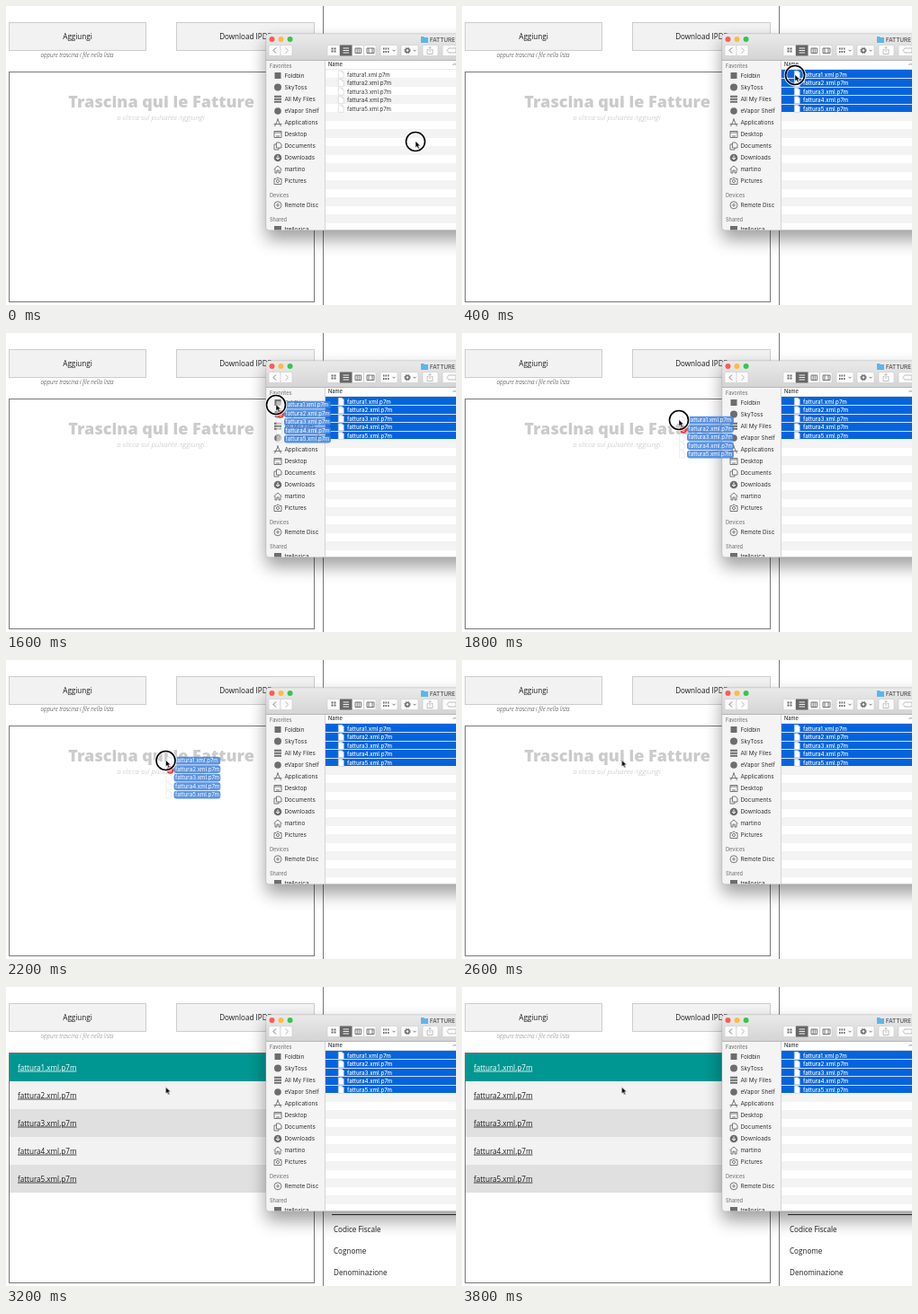
Animation of 500 by 333 pixels, one loop 4 s. Source, as an HTML page:

```html
<!DOCTYPE html>
<html lang="it">
<head>
<meta charset="utf-8">
<title>Trascina qui le Fatture</title>
<style>
  html, body { margin: 0; width: 100%; height: 100%; overflow: hidden; background: #fff; }
  svg { display: block; width: 500px; height: 333px; }
  text { white-space: pre; }
  .page { font: 8.1px "Open Sans", sans-serif; fill: #1c1c1c; }
  .mid { text-anchor: middle; }
  .title { font-size: 18px; font-weight: 800; fill: #cbcbcb; }
  .sub { font-size: 7.9px; font-weight: 300; font-style: italic; fill: #b8b8b8; }
  .hint { font-size: 6.3px; font-weight: 300; font-style: italic; }
  .link { text-decoration: underline; }
  .ui { font: 6.4px Inter, "Liberation Sans", sans-serif; fill: #333; }
  .head { font-size: 5.6px; font-weight: 500; fill: #7c7c7c; }
  .file { font-size: 6.2px; }
  .picked .file { fill: #fff; font-weight: 500; }
  .shadow { filter: blur(9.5px); }

  .hint, .empty, .loaded, .rest, .first, .ring, .ghost, .cursor {
    animation: 4s step-end infinite;
  }
  .hint { animation-name: fade; }
  .empty { animation-name: empty; }
  .loaded { animation-name: loaded; }
  .rest { animation-name: rest; }
  .first { animation-name: first; }
  .ring { animation-name: ring; }
  .ghost { animation-name: ghost; }
  .cursor { animation-name: move; }

  @keyframes fade { 0% { fill: #222 } 70%, 100% { fill: #777 } }
  @keyframes empty { 0% { visibility: visible } 70%, 100% { visibility: hidden } }
  @keyframes loaded { 0% { visibility: hidden } 70%, 100% { visibility: visible } }
  @keyframes rest { 0% { visibility: hidden } 5%, 100% { visibility: visible } }
  @keyframes first { 0% { visibility: hidden } 10%, 100% { visibility: visible } }
  @keyframes ring { 0% { visibility: visible } 65%, 100% { visibility: hidden } }
  @keyframes ghost {
    0% { visibility: hidden } 35% { visibility: visible } 65%, 100% { visibility: hidden }
  }
  @keyframes move {
    0% { transform: translate(455px, 151px) }
    5% { transform: translate(396px, 92px) }
    10% { transform: translate(370px, 77px) }
    30% { transform: translate(369px, 76px) }
    35% { transform: translate(362px, 75px) }
    40% { transform: translate(300px, 80px) }
    45% { transform: translate(241px, 97px) }
    50% { transform: translate(185px, 108px) }
    55%, 100% { transform: translate(177.5px, 112px) }
  }
</style>
</head>
<body>
<svg viewBox="0 0 500 333">
  <defs>
    <linearGradient id="bar" x2="0" y2="1">
      <stop stop-color="#ebeaeb"/><stop offset="1" stop-color="#d5d4d5"/>
    </linearGradient>
    <clipPath id="frame"><rect x="289" y="31" width="240" height="218.5" rx="3.5"/></clipPath>
    <g id="doc">
      <path d="M-3-4h4l2 2v6h-6z" fill="#fff" stroke="#c4c4c4" stroke-width=".5"/>
      <path d="M1-4v2h2" fill="none" stroke="#c4c4c4" stroke-width=".5"/>
    </g>
  </defs>

  <g class="page">
    <g fill="#f2f2f2" stroke="#cdcdcd">
      <rect x="3.5" y="18.5" width="152" height="31"/>
      <rect x="189.5" y="18.5" width="153" height="31"/>
    </g>
    <text class="mid" x="79.5" y="37">Aggiungi</text>
    <text class="mid" x="266" y="37">Download IPDF</text>
    <text class="mid hint" x="79" y="57">oppure trascina i file nella lista</text>
    <g class="empty">
      <text class="mid title" x="172.5" y="113">Trascina qui le Fatture</text>
      <text class="mid sub" x="172" y="127">o clicca sul pulsante Aggiungi</text>
    </g>
    <g class="loaded" id="list"></g>
    <rect x="3.5" y="73.5" width="339" height="256" fill="none" stroke="#777"/>
    <path d="M352.5 0v333" stroke="#777"/>
    <g class="loaded">
      <path d="M362 253.5h138" stroke="#333"/>
      <text x="364" y="273">Codice Fiscale</text>
      <text x="364" y="297">Cognome</text>
      <text x="364" y="321">Denominazione</text>
    </g>
  </g>

  <rect class="shadow" x="289" y="40" width="260" height="220" opacity=".38"/>

  <g class="ui" clip-path="url(#frame)">
    <rect x="289" y="31" width="240" height="219" fill="#fff"/>
    <rect x="289" y="60" width="65" height="190" fill="#f4f4f5"/>
    <path d="M354.5 60v190" stroke="#d3d3d3"/>
    <rect x="289" y="31" width="240" height="29" fill="url(#bar)"/>
    <path d="M289 60.5h211" stroke="#b7b5b7"/>
    <circle cx="295.5" cy="37" r="3" fill="#fc5b57"/>
    <circle cx="305.5" cy="37" r="3" fill="#fdbc40"/>
    <circle cx="315.6" cy="37" r="3" fill="#34c84a"/>
    <path d="M461 34h3l1 1h4v6h-8z" fill="#5cb6ea"/>
    <text x="471" y="39.6">FATTURE</text>
    <g id="tools" fill="#fbfbfb" stroke="#c4c2c4" stroke-width=".5"></g>
    <rect x="371" y="43.5" width="13.5" height="12" fill="#666"/>
    <g fill="none" stroke="#6a6a6a" stroke-width=".9">
      <path d="M300 46.5l-3 3 3 3"/>
      <path d="M310.5 46.5l3 3-3 3" stroke="#b5b5b5"/>
      <path d="M361.5 47.5h2m1 0h2m-5 3h2m1 0h2" stroke-width="2"/>
      <path d="M374.5 47h6.5m-6.5 2.5h6.5m-6.5 2.5h6.5" stroke="#fff"/>
      <path d="M388 47h6.5v5.5h-6.5zM390.2 47v5.5m2.1-5.5v5.5"/>
      <path d="M401 47h8v5.5h-8zM403 47v5.5m4-5.5v5.5"/>
      <path d="M419 47.5h1.5m1 0h1.5m1 0h1.5m-6.5 3.5h1.5m1 0h1.5m1 0h1.5" stroke-width="2"/>
      <path d="M429.5 48.8l1.5 1.5 1.5-1.5m20 0l1.5 1.5 1.5-1.5"/>
      <circle cx="446" cy="49.5" r="2.1" stroke-width="1.5"/>
      <circle cx="446" cy="49.5" r="3.3" stroke-dasharray="1.3 1.29"/>
      <g stroke="#b8b8b8">
        <path d="M469.5 48.5h-1.5v5h6v-5h-1.5m-1.5 3v-6m-1.5 1.5l1.5-1.5 1.5 1.5"/>
        <path d="M490 49.5l2-2.5h8v5h-8z"/>
      </g>
    </g>
    <text x="358" y="66.8" style="font-size:5.7px;font-weight:500">Name</text>
    <path d="M496.5 66l2-2 2 2" fill="none" stroke="#777" stroke-width=".8"/>
    <path d="M355 70.5h145" stroke="#dedede" stroke-width=".7"/>
    <g id="files"></g>
    <g id="side"></g>
  </g>
  <rect x="288.8" y="30.8" width="240" height="219" rx="3.5" fill="none" stroke="#b0b0b0" stroke-width=".5"/>

  <g class="cursor ui">
    <g class="ghost" id="ghost"></g>
    <g class="ring" fill="none">
      <circle r="10.5" stroke="#fff" stroke-width="3.6" opacity=".8"/>
      <circle r="10.5" stroke="#000" stroke-width="1.6"/>
    </g>
    <path d="M0-.5v7.2l1.700-1.500 1.200 2.800 1.400-.6-1.200-2.700h2.300z" fill="#000" stroke="#fff" stroke-width=".5"/>
  </g>
</svg>
<script>
  const $ = id => document.getElementById(id);

  function add(parent, tag, attrs, text) {
    const node = document.createElementNS("http://www.w3.org/2000/svg", tag);
    for (const key in attrs) node.setAttribute(key, attrs[key]);
    if (text) node.textContent = text;
    return parent.appendChild(node);
  }

  const names = [1, 2, 3, 4, 5].map(n => `fattura${n}.xml.p7m`);
  const PITCH = 9.5;
  const rowTop = i => 71.2 + PITCH * i;

  // Uploaded list on the page
  names.forEach((name, i) => {
    const y = 74 + 31 * i;
    const fill = i ? (i % 2 ? "#f2f2f2" : "#e0e0e0") : "#009691";
    add($("list"), "rect", { x: 3, y, width: 340, height: 31, fill });
    add($("list"), "text", { x: 13, y: y + 18.6, class: "link", fill: i ? "#1c1c1c" : "#fff" }, name);
  });

  // Toolbar buttons: x, width
  [[292, 13], [305, 13], [357, 13.5], [370.5, 13.5], [384, 13.5], [397.5, 13.5],
   [416, 19], [439, 19], [463, 17], [485, 20]].forEach(([x, width]) =>
    add($("tools"), "rect", { x, y: 43.5, width, height: 12, rx: 1.5 }));

  // Folder contents, with row edges on whole pixels
  function band(parent, i, fill) {
    const y = Math.floor(rowTop(i));
    add(parent, "rect", { x: 355, y, width: 145, height: Math.floor(rowTop(i + 1)) - y, fill });
    return y;
  }
  function fileRow(parent, name, i) {
    add(parent, "use", { href: "#doc", x: 372.3, y: rowTop(i) + 5 });
    add(parent, "text", { x: 379, y: rowTop(i) + 7.3, class: "file" }, name);
  }
  for (let i = 1; i < 19; i += 2) band($("files"), i, "#f3f3f4");
  names.forEach((name, i) => fileRow($("files"), name, i));
  names.forEach((name, i) => {
    const row = add($("files"), "g", { class: "picked " + (i ? "rest" : "first") });
    const y = band(row, i, "#0564dc");
    if (i) add(row, "rect", { x: 355, y, width: 145, height: 1, fill: "#fff", opacity: .8 });
    fileRow(row, name, i);
  });

  // Dragged copies
  names.forEach((name, i) => {
    const y = PITCH * i;
    add($("ghost"), "use", { href: "#doc", x: 3.5, y, opacity: .55 });
    add($("ghost"), "rect", { x: 9, y: y - 4.2, width: 52, height: 8.8, rx: 3, fill: "#3f82dd", opacity: .85 });
    add($("ghost"), "text", { x: 10.5, y: y + 2.4, class: "file", fill: "#fff" }, name);
  });
  add($("ghost"), "circle", { cx: 5, cy: 10.5, r: 4.2, fill: "#ee3a35" });
  add($("ghost"), "text", { x: 5, y: 12.6, class: "mid", fill: "#fff", "font-size": 6 }, "5");

  // Sidebar: label, centre y, icon path, filled?
  const disc = r => `M${-r} 0a${r} ${r} 0 1 0 ${2 * r} 0a${r} ${r} 0 1 0 ${-2 * r} 0z`;
  const items = [
    ["Foldbin", 77.5, "M-3.5-3.5h7v7h-7z", 1],
    ["SkyToss", 90.6, disc(4), 1],
    ["All My Files", 103.8, "M-4-4h8v2h-8zM-4-1h8v2h-8zM-4 2h8v2h-8z", 1],
    ["eVapor Shelf", 117, disc(3.8), 1],
    ["Applications", 130, "M.5-4.5l-4 8.5M-.5-4.5l4 8.5M-4.5 1.5h9"],
    ["Desktop", 143, "M-4-3.5h8v7h-8zM-4-2h8M-2 2h4"],
    ["Documents", 156, "M-1.5-4h3.5l2 2v4h-5.5zM-1.5-2h-2.5v6h5v-2"],
    ["Downloads", 169, disc(4.3), 1],
    ["martino", 182, "M-4.5 0l4.5-4 4.5 4M-3-.5v4.5h2v-3h2v3h2v-4.5"],
    ["Pictures", 195, "M-4-2.5h2l1-1.2h2l1 1.2h2v6h-8z" + disc(1.6)],
    ["Remote Disc", 221.8, disc(4) + disc(1.2)],
    ["trellosica", 248.6, "M-4-3.5h8v5.5h-8zM-2 3.5h4", 1]
  ];
  for (const [label, y, d, solid] of items) {
    add($("side"), "path", {
      d, transform: `translate(302 ${y})`, fill: solid ? "#6d6d6d" : "none",
      stroke: solid ? "none" : "#6d6d6d", "stroke-width": .9
    });
    add($("side"), "text", { x: 309.4, y: y + 2.4 }, label);
  }
  add($("side"), "path", { d: "M302 166.5v4.5m-2-2l2 2 2-2", fill: "none", stroke: "#fff" });
  [["Favorites", 68.8], ["Devices", 212.8], ["Shared", 239.6]].forEach(([label, y]) =>
    add($("side"), "text", { x: 293, y, class: "head" }, label));
</script>
</body>
</html>
```
